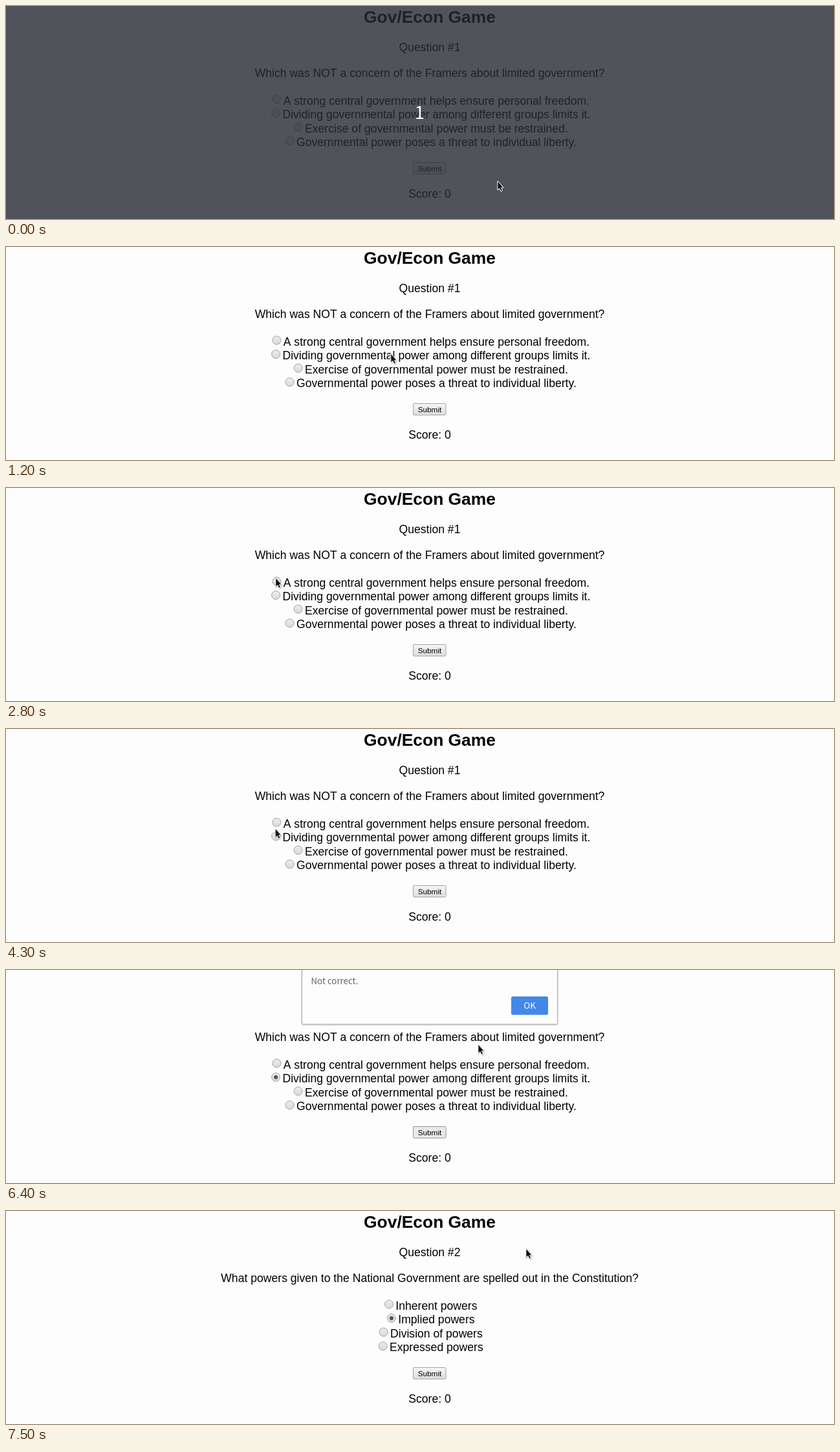
An HTML page with a canvas for the animation above (8000 ms loop, 1280 by 330 pixels).

```html
<!DOCTYPE html>
<html lang="en">
<head>
<meta charset="utf-8">
<title>Quiz</title>
<style>
  html, body { margin: 0; width: 100%; height: 100%; overflow: hidden; background: #fefdfe; }
  canvas { display: block; }
</style>
</head>
<body>
<canvas id="stage" width="1280" height="330"></canvas>
<script>
const LOOP = 8000, STEP = 100, W = 1280, H = 330, MID = 655;
const ctx = document.getElementById('stage').getContext('2d');
const SANS = '"Liberation Sans", Arial, sans-serif';
const UI = '"Noto Sans CJK SC", "Noto Sans CJK JP", "Noto Sans", sans-serif';
const BODY = '17.6px ' + SANS;
const ROW = 21.6;

// Moments of the story, in ms
const START = 100, PICK = 4600, HOVER = 5600, ALERT = 5900, PRESS = 7100, NEXT = 7200;

const questions = [
  {
    text: 'Which was NOT a concern of the Framers about limited government?',
    answers: [
      'A strong central government helps ensure personal freedom.',
      'Dividing governmental power among different groups limits it.',
      'Exercise of governmental power must be restrained.',
      'Governmental power poses a threat to individual liberty.'
    ]
  },
  {
    text: 'What powers given to the National Government are spelled out in the Constitution?',
    answers: ['Inherent powers', 'Implied powers', 'Division of powers', 'Expressed powers']
  }
];

// Pointer trips between resting places
const home = { x: 760, y: 271 };
const trips = [
  { from: 800, to: 1200, x: 595, y: 165 },
  { from: 1300, to: 1700, x: 422, y: 138 },
  { from: 1800, to: 2800, x: 417, y: 139 },
  { from: 4000, to: 4500, x: 416, y: 162 },
  { from: 4800, to: 5400, x: 634.5, y: 264 },
  { from: 5500, to: 5700, x: 649, y: 253 },
  { from: 6100, to: 6600, x: 774, y: 40 },
  { from: 6700, to: 7000, x: 804, y: 58 }
];

const clamp = v => Math.min(1, Math.max(0, v));
const smooth = v => v * v * (3 - 2 * v);

function pointerAt(t) {
  return trips.reduce((p, trip) => {
    const k = smooth(clamp((t - trip.from) / (trip.to - trip.from)));
    return { x: p.x + (trip.x - p.x) * k, y: p.y + (trip.y - p.y) * k };
  }, home);
}

function label(str, x, y, font, color = '#000', align = 'center') {
  ctx.font = font;
  ctx.fillStyle = color;
  ctx.textAlign = align;
  ctx.fillText(str, x, y);
}

function shade(y0, y1, top, bottom) {
  const g = ctx.createLinearGradient(0, y0, 0, y1);
  g.addColorStop(0, top);
  g.addColorStop(1, bottom);
  return g;
}

function disc(x, y, r, fill) {
  ctx.beginPath();
  ctx.arc(x, y, r, 0, Math.PI * 2);
  ctx.fillStyle = fill;
  ctx.fill();
}

function box(x, y, w, h, r, fill) {
  ctx.beginPath();
  ctx.roundRect(x, y, w, h, r);
  ctx.fillStyle = fill;
  ctx.fill();
}

function outline(color) {
  ctx.strokeStyle = color;
  ctx.lineWidth = 1;
  ctx.stroke();
}

function drawAnswer(answer, i, on) {
  const x = MID + 10.4, y = 144.5 + ROW * i;
  label(answer, x, 152.5 + ROW * i, BODY);
  const cx = x - ctx.measureText(answer).width / 2 - 10.3;
  disc(cx, y, 6.5, shade(y - 6, y + 6, '#ececec', '#dadada'));
  outline('#a2a2a2');
  if (on) disc(cx, y, 3.1, '#555');
}

function drawSubmit(t) {
  const active = t >= HOVER && t <= NEXT;
  const held = active && t >= ALERT;
  box(629.5, 242.5, 50.5, 17.8, 1.5, held ? '#e9e9e9' : shade(243, 260, '#f5f5f5', '#dddddd'));
  outline(active ? '#949494' : '#a3a3a3');
  label('Submit', MID, 255.5, '11.73px ' + SANS);
}

function drawPage(t) {
  const index = t < NEXT ? 0 : 1;
  const { text, answers } = questions[index];
  ctx.fillStyle = '#fefdfe';
  ctx.fillRect(0, 0, W, H);
  label('Gov/Econ Game', MID, 25.5, 'bold 26.4px ' + SANS);
  label('Question #' + (index + 1), MID, 69.5, BODY);
  label(text, MID, 110, BODY);
  answers.forEach((answer, i) => drawAnswer(answer, i, i === 1 && t >= PICK));
  drawSubmit(t);
  label('Score: 0', MID, 296.7, BODY);
}

function drawDialog(t) {
  const shown = clamp((t - ALERT + STEP) / 200), gone = clamp((t - NEXT + STEP) / 300);
  ctx.save();
  ctx.globalAlpha = shown * (1 - gone);
  ctx.shadowColor = 'rgba(0,0,0,.3)';
  ctx.shadowBlur = 3;
  ctx.shadowOffsetY = 1;
  box(457.5, -60, 395, 144, 2, '#fefdfe');
  ctx.shadowColor = 'transparent';
  outline('#a9a9ab');
  label('Not correct.', 471.5, 21.8, '13.3px ' + UI, '#646464', 'left');
  box(781, 41, 57, 28.5, 2.5, t >= PRESS ? '#3a78d2' : '#4288ea');
  label('OK', 809.5, 60, '13.3px ' + UI, '#fff');
  ctx.restore();
}

function drawPointer(t) {
  const { x, y } = pointerAt(t);
  const arrow = new Path2D('M1 1.8V14.2L3.7 11.7L5.9 16.3L7.7 15.4L5.6 10.9H9Z');
  ctx.save();
  ctx.translate(x - .7, y - .7);
  ctx.lineJoin = 'round';
  ctx.lineWidth = 2;
  ctx.strokeStyle = '#fff';
  ctx.shadowColor = 'rgba(0,0,0,.35)';
  ctx.shadowBlur = 2;
  ctx.shadowOffsetX = ctx.shadowOffsetY = .8;
  ctx.stroke(arrow);
  ctx.shadowColor = 'transparent';
  ctx.fillStyle = '#111';
  ctx.fill(arrow);
  ctx.restore();
}

function drawCountdown() {
  ctx.fillStyle = 'rgba(38,42,50,.8)';
  ctx.fillRect(0, 0, W, H);
  label('1', 639.5, 174.5, '27.5px ' + UI, '#fff');
}

function frame() {
  const t = Math.floor(performance.now() % LOOP / STEP) * STEP;
  drawPage(t);
  drawDialog(t);
  if (t < START) drawCountdown();
  drawPointer(t);
  requestAnimationFrame(frame);
}
frame();
</script>
</body>
</html>
```
